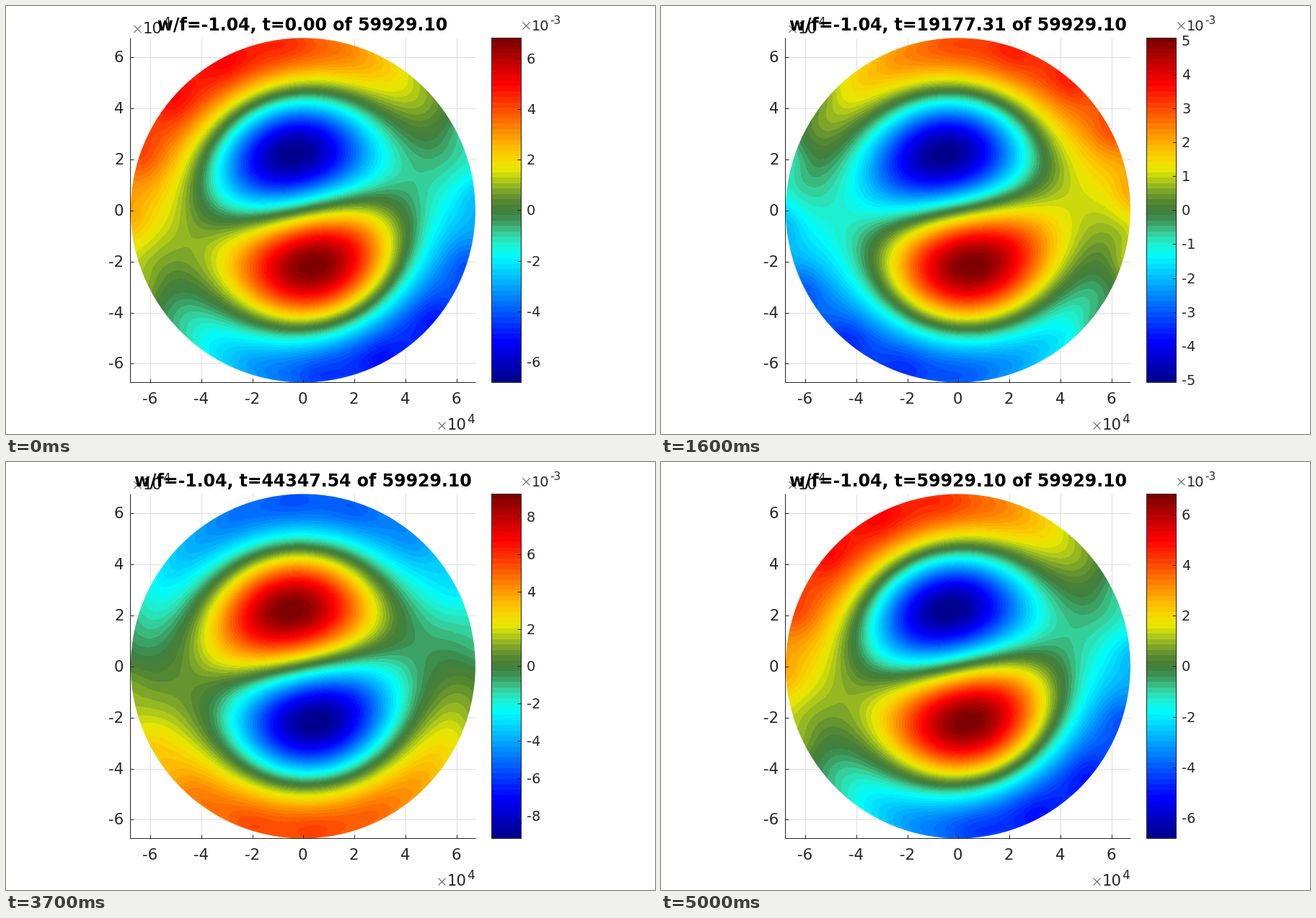
Write a matplotlib script that moves like this. It is 900x594 px and loops after 5100 ms.

```python
import numpy as np
import matplotlib.pyplot as plt
from matplotlib.animation import FuncAnimation
from matplotlib.collections import LineCollection
from matplotlib.colors import ListedColormap
from matplotlib.patches import Circle, Rectangle

W, H, DPI = 900, 594, 72
FRAMES, STEP_MS = 51, 100
PERIOD = 59929.103
CX, CY, HALF = 411.9, 283.4, 239
R = 6.75
SCALE = HALF / R
BAR_X, BAR_W = 672.5, 41
INK = "#262626"
AXIS_SIZE, BAR_SIZE, TITLE_SIZE = 21.3, 19.2, 23.65

plt.rcParams["font.family"] = "DejaVu Sans"


def darkened_jet(n=64):
    """Jet with a dark green valley around zero."""
    i = np.arange(1, n + 1)

    def ramp(k):
        return np.clip(np.minimum(k, 48 - k) / 16, 0, 1)

    rgb = np.stack([ramp(i - 24), ramp(i - 8), ramp(i + 8)], axis=1)
    x = (i - 32.5) / n
    width = np.where(x > 0, 0.092, 0.07)
    return rgb * (1 - 0.5 * np.exp(-(x / width) ** 2))[:, None]


def bessel1(z):
    tau = (np.arange(200) + 0.5) * np.pi / 200
    return np.cos(tau - np.outer(z, np.sin(tau))).mean(axis=1)


def wave_parts():
    """The tilted vortex pair and the sideways slosh, both on the pixel grid."""
    n = 2 * HALF
    axis = ((np.arange(n) + 0.5) / n * 2 - 1) * R
    x, y = np.meshgrid(axis, -axis)
    r, phi = np.hypot(x, y), np.arctan2(y, x)

    radii = np.linspace(0, 10, 600)
    radial = np.interp(r, radii, bessel1(0.824 * radii) / 0.5819)
    pair = radial * np.sin(phi - 0.2)
    slosh = 0.17 * x * (1 - np.exp(-(r / 4.3) ** 1.5))

    bumps = np.zeros_like(x)
    for a in np.radians(4.5 + 22.5 * np.arange(16)):
        d2 = (x - R * np.cos(a)) ** 2 + (y - R * np.sin(a)) ** 2
        bumps += np.exp(-d2 / 0.8 ** 2)
    return pair * (1 + 0.06 * bumps), slosh * (1 + 0.26 * bumps), r <= R


COLORS = darkened_jet()
PAIR, SLOSH, INSIDE = wave_parts()

fig = plt.figure(figsize=(W / DPI, H / DPI), dpi=DPI, facecolor="white")
ax = fig.add_axes([0, 0, 1, 1])
ax.set_xlim(0, W)
ax.set_ylim(H, 0)
ax.axis("off")


def line(x0, y0, x1, y1, color=INK, z=4):
    return ax.plot([x0, x1], [y0, y1], color=color, lw=1, zorder=z,
                   solid_capstyle="butt")[0]


def label(x, y, s, size, ha="left", **kw):
    return ax.text(x, y, s, fontsize=size, ha=ha, va="baseline",
                   color=kw.pop("color", INK), zorder=kw.pop("zorder", 5), **kw)


def exponent(x, y, size, power):
    """A power-of-ten multiplier with its baseline at y."""
    a, b = y - 11, y - 1
    after = x + 13.5 + 1.273 * size
    return [line(x + 0.5, a, x + 10.5, b, "#555555"),
            line(x + 0.5, b, x + 10.5, a, "#555555"),
            label(x + 12.5, y, "10", size),
            label(after, y - 0.46 * size, power, 0.8 * size)]


# Axes, grid and tick labels
LEFT, RIGHT, TOP, BOTTOM = CX - HALF, CX + HALF, CY - HALF, CY + HALF
for v in range(-6, 7, 2):
    px, py = np.floor([CX + v * SCALE, CY - v * SCALE]) + 0.5
    line(px, TOP, px, BOTTOM, "#dedede", 1)
    line(LEFT, py, RIGHT, py, "#dedede", 1)
    line(px, BOTTOM, px, BOTTOM - 5)
    line(LEFT - 0.5, py, LEFT + 4.5, py)
    label(px, 552.5, str(v), AXIS_SIZE, "center")
    label(163.5, py + 7.75, str(v), AXIS_SIZE, "right")
line(LEFT - 0.5, TOP, LEFT - 0.5, BOTTOM)
line(LEFT - 0.5, BOTTOM, RIGHT, BOTTOM)
exponent(599, 588.5, AXIS_SIZE, "4")
exponent(177, 38, AXIS_SIZE, "4")

# Disc
disc = ax.imshow(np.zeros(PAIR.shape), cmap=ListedColormap(COLORS), vmin=0, vmax=64,
                 extent=[LEFT, RIGHT, BOTTOM, TOP], aspect="auto",
                 interpolation="nearest", zorder=2)
disc.set_clip_path(Circle((CX, CY), HALF, transform=ax.transData))

# Colour bar
ax.imshow(COLORS[::-1, None, :], extent=[BAR_X, BAR_X + BAR_W, BOTTOM, TOP],
          aspect="auto", interpolation="nearest", zorder=2)
ax.add_patch(Rectangle((BAR_X, TOP), BAR_W, 2 * HALF, fill=False, ec=INK,
                       lw=1, zorder=4))
bar_ticks = LineCollection([], colors=INK, linewidths=1, zorder=4)
ax.add_collection(bar_ticks, autolim=False)
bar_labels = [label(722, 0, "", BAR_SIZE) for _ in range(13)]
bar_exp_top = exponent(716, 33.5, BAR_SIZE, "-3")
bar_exp_low = exponent(716, 553.5, BAR_SIZE, "-3")

title = label(411.5, 34, "", TITLE_SIZE, "center", color="black",
              weight="bold", zorder=6)
ax.set_xlim(0, W)
ax.set_ylim(H, 0)


def tick_step(limit):
    for bound, step in ((3, 0.5), (6, 1), (10, 2)):
        if limit < bound:
            return step
    return 5


def update_bar(limit):
    step = tick_step(limit)
    count = int(limit / step)
    ticks = step * np.arange(-count, count + 1)
    ys = CY - ticks / limit * HALF
    right = BAR_X + BAR_W
    bar_ticks.set_segments([[(right - 5, y), (right, y)] for y in ys])
    for text in bar_labels:
        text.set_text("")
    unit = 0.001 if step == 5 else 1
    for text, v, y in zip(bar_labels, ticks, ys):
        text.set_text(f"{v * unit:g}")
        text.set_y(y + 7)
    for part in bar_exp_top:
        part.set_visible(step in (1, 2))
    for part in bar_exp_low:
        part.set_visible(step == 0.5)


def update(i):
    turn = i / (FRAMES - 1)
    c, s = np.cos(2 * np.pi * turn), np.sin(2 * np.pi * turn)
    field = -(6.85 * c + 8.78 * s) * PAIR + (-1.7 * c + 1.35 * s) * SLOSH
    limit = np.abs(field[INSIDE]).max()
    disc.set_data(np.clip(np.floor((field / limit + 1) * 32), 0, 63) + 0.5)
    update_bar(limit)
    title.set_text(f"w/f=-1.04, t={turn * PERIOD:.2f} of {PERIOD:.2f}")
    return []


anim = FuncAnimation(fig, update, frames=FRAMES, interval=STEP_MS,
                     repeat=True, repeat_delay=0, blit=False)
plt.show()
```
